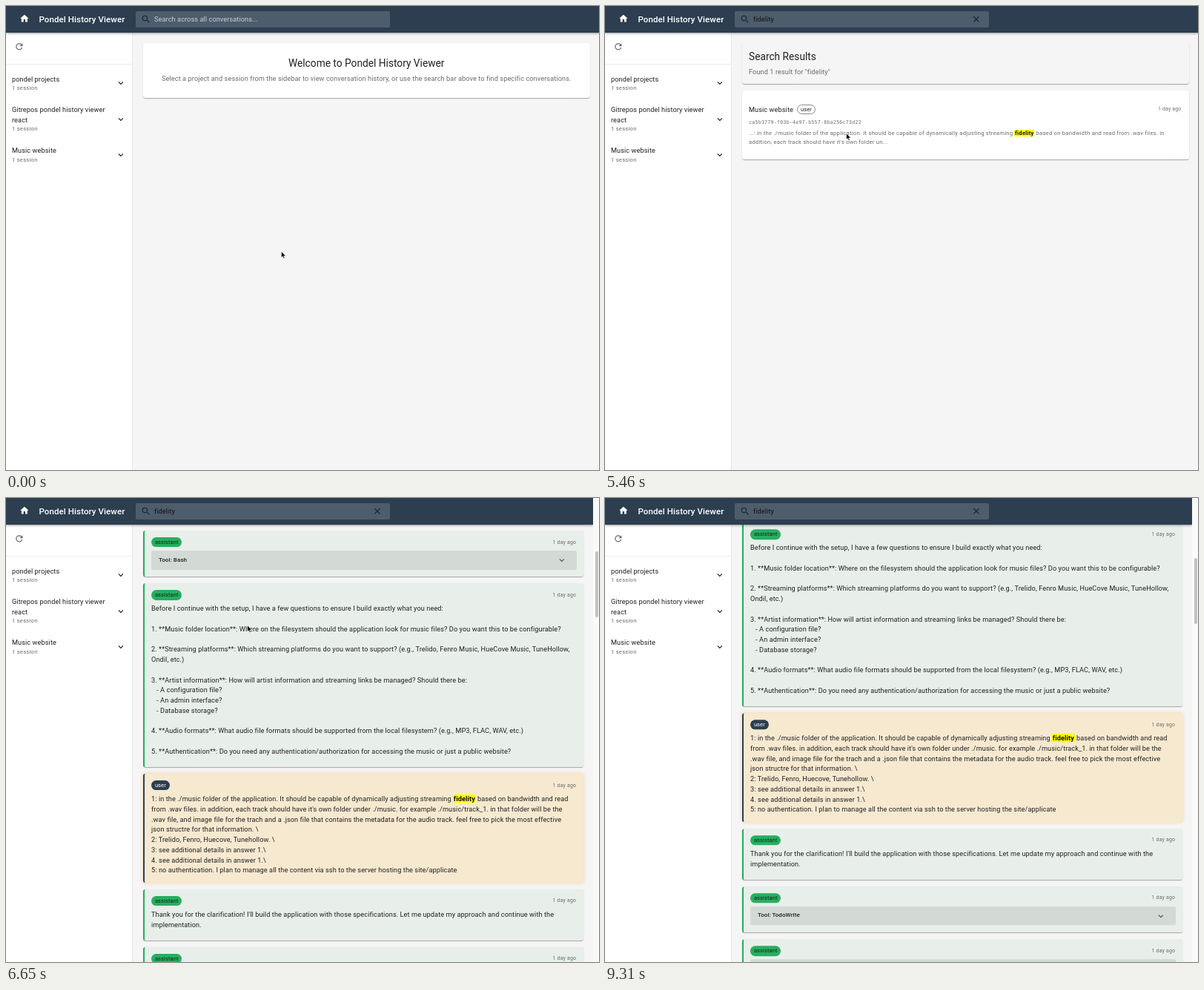
An HTML page for the animation above (9.52 s loop, 800 by 626 pixels).

```html
<!DOCTYPE html>
<html lang="en">
<head>
<meta charset="utf-8">
<title>History Viewer</title>
<style>
  html, body { margin: 0; width: 100%; height: 100%; overflow: hidden; background: #f5f5f5; }
  body, body * { box-sizing: border-box; }
  body { position: relative; font: 9.19px Roboto, sans-serif; letter-spacing: .00938em; color: #212121; }
  div, p, svg { position: absolute; margin: 0; }
  p { white-space: pre; line-height: 0; }
  svg { width: 13.74px; height: 13.74px; fill: currentColor; }
  mark { background: #ff0; color: #111; font-weight: 700; padding: 0 .7px; border-radius: 1px; }
  .dim { color: #6b6b6b; }
  .navy { color: #2c3e50; }
  .title { font-size: 13.74px; letter-spacing: 0; }
  .small { font-size: 7.62px; letter-spacing: .0333em; }
  .ago { font-size: 6.87px; letter-spacing: .0333em; color: #6b6b6b; }
  .mono { font-family: "DejaVu Sans Mono", monospace; color: #6b6b6b; }
  #results .mono { font-size: 6.65px; letter-spacing: .0333em; }
  #chat .mono { font-size: 8.03px; }
  .mid { left: 0; right: 0; text-align: center; }
  #top { left: 0; top: 0; width: 800px; height: 36px; background: #2c3e50; color: #fff;
    box-shadow: 0 1px 3px rgba(0,0,0,.4); }
  #brand { font-size: 11.54px; font-weight: 500; letter-spacing: .0075em; }
  #field { left: 174.5px; top: 6.5px; width: 343.5px; height: 22px; border-radius: 2px; }
  #caret { left: 200px; top: 12px; width: 1px; height: 11px; background: #111; }
  #side { left: 0; top: 36px; width: 171px; height: 590px; background: #fff; border-right: 1px solid #e6e6e6; }
  #rule { left: 0; top: 78px; width: 171px; height: 1px; background: #ececec; }
  .paper, .card { border-radius: 3px;
    box-shadow: 0 1.4px .7px -.7px rgba(0,0,0,.2), 0 .7px .7px rgba(0,0,0,.14), 0 .7px 2px rgba(0,0,0,.12); }
  .paper { left: 185px; width: 602.5px; background: #fff; }
  .plain { background: #f5f5f5; }
  .chip { height: 13.75px; padding: 0 4.7px; border-radius: 7px; font-size: 7.56px; line-height: 13.75px; }
  .outline { border: 1px solid #888; padding: 0 4px; line-height: 11.75px; }
  #chat { left: 185px; top: 0; width: 593.5px; }
  .card { position: relative; margin-bottom: 9px; padding: 27.4px 0 9.4px 9px; border-left: 2px solid; }
  .card .chip { left: 9.2px; top: 8.9px; }
  .card .ago { right: 9.3px; top: 15.8px; }
  .card .text { position: static; line-height: 13.75px; }
  .user { background: #e2e5e7; border-color: #2c3e50; }
  .user .chip { background: #2c3e50; color: #fff; }
  .assistant { background: #e8efea; border-color: #27ae60; padding-bottom: 14.2px; }
  .assistant .chip { background: #27ae60; color: #10291a; }
  .found { background: #f6e9d0; box-shadow: 0 0 4px 1px rgba(243,156,18,.28); }
  .tool { position: relative; width: 574px; height: 25.3px; margin-bottom: -4.7px; background: #d3dad5; border-radius: 2px; }
  .tool p { left: 10px; top: 12.4px; font-size: 8px; font-weight: 500; }
  .tool svg { left: 546.5px; top: 5.8px; color: #555; }
  #bar { left: 792px; top: 0; width: 8px; height: 626px; background: #fafafa; }
  #thumb { left: 2.5px; width: 4.5px; height: 89px; border-radius: 3px; background: #c1c1c1; }
  #arrow, #beam { left: 0; top: 0; overflow: visible; stroke: #fff; stroke-width: .7; fill: #000; }
</style>
</head>
<body>
<script>
const LOOP = 9520, QUERY = 'fidelity', UUID = 'ca5b3779-f03b-4e97-b557-8ba256c73d22';
const keyTimes = [2100, 2380, 2590, 2730, 2870, 3080, 3150, 3430];
const $ = id => document.getElementById(id);

const icons = {
  home: 'M10 20v-6h4v6h5v-8h3L12 3 2 12h3v8z',
  search: 'M15.5 14h-.79l-.28-.27A6.47 6.47 0 0 0 16 9.5 6.5 6.5 0 1 0 9.5 16c1.61 0 3.09-.59 4.23-1.57l.27.28v.79l5 4.99L20.49 19zm-6 0a4.5 4.5 0 1 1 0-9 4.5 4.5 0 0 1 0 9z',
  clear: 'M19 6.41 17.59 5 12 10.59 6.41 5 5 6.41 10.59 12 5 17.59 6.41 19 12 13.41 17.59 19 19 17.59 13.41 12z',
  refresh: 'M17.65 6.35A8 8 0 1 0 19.73 14h-2.08A6 6 0 1 1 12 6c1.66 0 3.14.69 4.22 1.78L13 11h7V4z',
  more: 'M16.59 8.59 12 13.17 7.41 8.59 6 10l6 6 6-6z'
};
// Both helpers place things by their vertical centre.
const icon = (name, x, y, color = '#222', id = '') =>
  `<svg id="${id}" viewBox="0 0 24 24" style="left:${x - 6.87}px;top:${y - 6.87}px;color:${color}"><path d="${icons[name]}"/></svg>`;
const text = (x, y, str, cls = '', id = '') =>
  `<p id="${id}" class="${cls}" style="left:${x}px;top:${y}px">${str}</p>`;
const paper = (y, h, cls, inner) =>
  `<div class="paper ${cls}" style="top:${y}px;height:${h}px">${inner}</div>`;
const hit = `<mark>${QUERY}</mark>`;

const project = (y, name, rows = 1) => {
  const end = y + (rows - 1) * 13.75;
  return name.split('\n').map((row, i) => text(8, y + i * 13.75, row)).join('') +
    text(8, end + 12.5, '1 session', 'small dim') + icon('more', 154.5, (y + end + 11) / 2);
};
const card = (role, body, cls = '') =>
  `<div class="card ${role} ${cls}"><div class="chip">${role}</div><p class="ago">1 day ago</p>${body}</div>`;
const say = (role, str, cls) => card(role, `<p class="text">${str}</p>`, cls);
const tool = name => card('assistant',
  `<div class="tool"><p>Tool: ${name}</p><svg viewBox="0 0 24 24"><path d="${icons.more}"/></svg></div>`);

const brief = `Create a website/application for displaying links to a specific artist across many different streaming platforms as well as having the
capability to play  music located in a specific folder on the filesystem. The front end  should look and function very similar to a
tunehollow's artists website. The website/application will run on the industry standard linux distribution for web app hosting. Use nodejs
and typescript for the backend and vuejs for the front end. Ask questions when you come to a decision points during implementation.`;
const questions = `Before I continue with the setup, I have a few questions to ensure I build exactly what you need:

1. **Music folder location**: Where on the filesystem should the application look for music files? Do you want this to be configurable?

2. **Streaming platforms**: Which streaming platforms do you want to support? (e.g., Trelido, Fenro Music, HueCove Music, TuneHollow,
Ondil, etc.)

3. **Artist information**: How will artist information and streaming links be managed? Should there be:
   - A configuration file?
   - An admin interface?
   - Database storage?

4. **Audio formats**: What audio file formats should be supported from the local filesystem? (e.g., MP3, FLAC, WAV, etc.)

5. **Authentication**: Do you need any authentication/authorization for accessing the music or just a public website?`;
const answers = `1: in the ./music folder of the application. It should be capable of dynamically adjusting streaming ${hit} based on bandwidth and read
from .wav files. in addition, each track should have it's own folder under ./music. for example ./music/track_1. in that folder will be the
.wav file, and image file for the trach and a .json file that contains the metadata for the audio track. feel free to pick the most effective
json structre for that information. \\
2: Trelido, Fenro, Huecove, Tunehollow. \\
3: see additional details in answer 1.\\
4. see additional details in answer 1.\\
5: no authentication. I plan to manage all the content via ssh to the server hosting the site/applicate`;

document.body.innerHTML = `
<div id="welcome">${paper(50, 73.5, '',
  text(0, 27.3, 'Welcome to Pondel History Viewer', 'title mid') +
  text(0, 48.3, 'Select a project and session from the sidebar to view conversation history, or use the search bar above to find specific conversations.', 'dim mid'))}</div>
<div id="results">${paper(50, 55, 'plain',
  text(9, 18.3, 'Search Results', 'title') + text(9, 39, `Found 1 result for "${QUERY}"`, 'dim'))}
${paper(113.5, 93, '',
  text(9, 26, 'Music website') +
  '<div class="chip outline" style="left:74px;top:19px">user</div>' +
  '<p class="ago" style="right:10px;top:25.7px">1 day ago</p>' +
  text(9, 43.3, UUID, 'mono') +
  text(9, 58.6, `...: in the ./music folder of the application. It should be capable of dynamically adjusting streaming ${hit} based on bandwidth and read from .wav files. in`, 'small dim') +
  text(9, 70, "addition, each track should have it's own folder un...", 'small dim'))}</div>
<div id="chat">
  <div class="paper plain" style="left:0;top:50px;width:100%;height:69.5px">${
    text(9, 18.3, 'Music website', 'title') + text(9, 38.7, UUID, 'mono') +
    text(9, 54.5, `Showing results for: "${QUERY}"`, 'small navy')}</div>
  <div style="top:128.7px;width:100%">${[
    say('user', brief),
    say('assistant', "I'll help you create a music streaming website/application with a TuneHollow-like interface. Let me start by planning out the\nimplementation."),
    tool('TodoWrite'),
    say('assistant', 'Let me start by setting up the project structure.'),
    tool('TodoWrite'), ...Array(4).fill(tool('Bash')),
    say('assistant', questions),
    say('user', answers, 'found'),
    say('assistant', "Thank you for the clarification! I'll build the application with those specifications. Let me update my approach and continue with the\nimplementation."),
    tool('TodoWrite'), tool('Bash')].join('')}</div>
</div>
<div id="side"></div><div id="rule"></div>
${icon('refresh', 18, 55, '#666')}
${project(98.5, 'pondel projects')}
${project(140, 'Gitrepos pondel history viewer\nreact', 2)}
${project(195, 'Music website')}
<div id="top"><div id="field"></div>
  ${icon('home', 24.5, 17.3, '#fff')}
  ${text(44.4, 17.5, 'Pondel History Viewer', '', 'brand')}
  ${icon('search', 188.7, 17.5, '#18232d')}
  ${text(200, 17.5, '', '', 'input')}<div id="caret"></div>
  ${icon('clear', 500.5, 17.5, '#18232d', 'clear')}
</div>
<div id="bar"><div id="thumb"></div></div>
<svg id="arrow" viewBox="0 0 13.74 13.74"><path d="M0 0V8.6L2 6.8 3.3 9.7 4.8 9 3.5 6.2H6.2Z"/></svg>
<svg id="beam" viewBox="0 0 13.74 13.74"><path d="M-2-5H2v1H.5V4H2V5H-2V4H-.5V-4H-2Z"/></svg>`;

const clamp = v => Math.min(1, Math.max(0, v));
const ease = v => v * v * (3 - 2 * v);
const span = (t, a, b) => clamp((t - a) / (b - a));
const mix = (a, b, v) => a + (b - a) * v;

// Scroll curve: time, offset, speed per ms
const scrollKeys = [[5880, 0, 0], [6090, 45, .37], [6370, 412.5, 1.11], [6650, 683.5, .44], [6930, 763.5, 0], [8120, 763.5, 0], [8400, 765.7, 0]];
function scrollAt(t) {
  const i = scrollKeys.findIndex(k => k[0] > t);
  if (i === 0) return 0;
  if (i < 0) return scrollKeys.at(-1)[1];
  const [t0, p, m] = scrollKeys[i - 1], [t1, q, n] = scrollKeys[i];
  const d = t1 - t0, u = (t - t0) / d, v = 1 - u;
  return v * v * (p * (1 + 2 * u) + d * m * u) + u * u * (q * (1 + 2 * v) - d * n * v);
}

function pointerAt(t) {
  if (t < 4130) {
    const v = ease(span(t, 70, 980));
    return [mix(371.3, 300, v), mix(331, 18, v)];
  }
  const v = ease(span(t, 4130, 4830)), out = span(t, 7490, 7910) ** 4;
  return [mix(300, 325.5, v) + 296 * out, mix(18, 171.8, v) + 464 * out];
}

const show = (id, on) => $(id).style.visibility = on ? 'visible' : 'hidden';

function draw(t) {
  const typed = QUERY.slice(0, keyTimes.filter(k => k <= t).length);
  const chat = t >= 5740, s = scrollAt(t), [x, y] = pointerAt(t);
  const over = y < 29, seen = t < 2100 || t >= 4130;

  show('welcome', t < 3570);
  show('results', t >= 3570 && !chat);
  show('chat', chat);
  show('bar', chat);
  $('top').style.width = chat ? '792px' : '800px';
  $('chat').style.transform = `translateY(${-s}px)`;
  $('thumb').style.top = 1.3 + .1035 * s + 'px';

  $('field').style.background = over ? '#667380' : '#4e5d6c';
  $('input').textContent = typed || 'Search across all conversations...';
  $('input').style.color = typed ? '#111' : '#c9cfd4';
  show('clear', typed);
  show('caret', t >= 1470 && t < 1960 || t >= 2100 && t < 3570);
  $('caret').style.left = 200 + (typed ? $('input').offsetWidth : 0) + 'px';

  show('arrow', seen && !over && y < 626);
  show('beam', seen && over);
  $('arrow').style.transform = $('beam').style.transform = `translate(${x}px,${y}px)`;
}

const start = performance.now();
function tick() {
  draw((performance.now() - start) % LOOP);
  requestAnimationFrame(tick);
}
tick();
</script>
</body>
</html>
```
